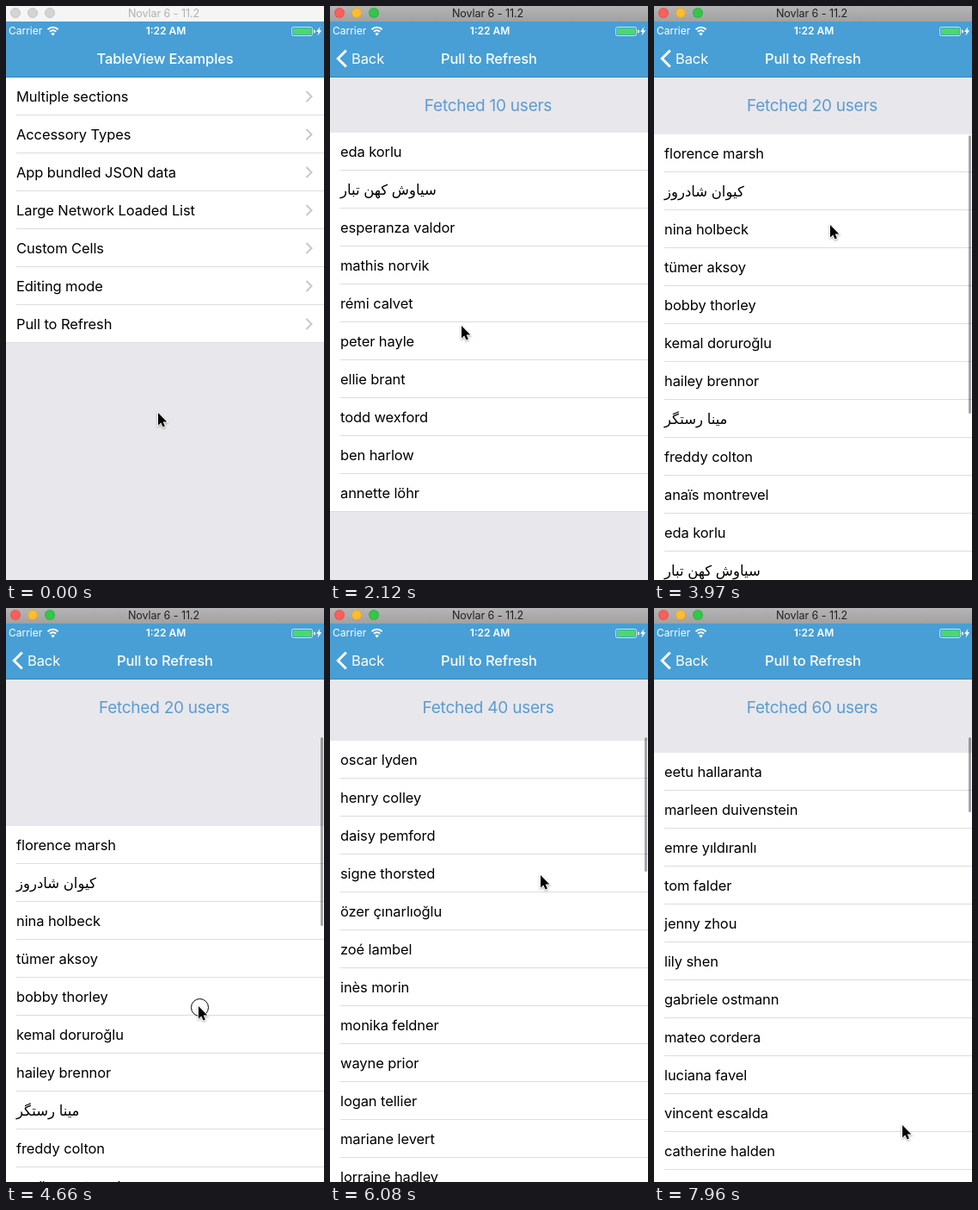
These frames come from a looping animation (370 by 666 pixels, 8000 ms). An HTML page:

```html
<!DOCTYPE html>
<html lang="en">
<head>
<meta charset="utf-8">
<title>TableView Examples</title>
<style>
  * { box-sizing: border-box; }
  html, body { margin: 0; width: 100%; height: 100%; overflow: hidden; background: #e8e7ec; }
  body { font: 16.5px/44px Inter, "Noto Sans", "DejaVu Sans", sans-serif; letter-spacing: -.1px; color: #000; }
  #stage { position: relative; width: 370px; height: 666px; overflow: hidden; white-space: nowrap; }
  #stage > *, .page, nav > *, .page > * { position: absolute; }
  ul { margin: 0; padding: 0; list-style: none; width: 370px; background: #fff; }
  li { position: relative; height: 44px; padding-left: 12px; }
  li::after { content: ""; position: absolute; left: 12px; right: 0; bottom: 0; height: 1px; background: #dddce0; }
  li:last-child::after { left: 0; }
  li.fa { letter-spacing: 0; }
  li svg { position: absolute; left: 347px; top: 14px; }
  li.on { background: #d9d9d9; }

  #bar { left: 0; top: 0; width: 370px; height: 18px; background: #f5f5f5; color: #b2b2b2;
         font-size: 12.6px; line-height: 17px; text-align: center; padding-right: 3px; }
  #bar i { position: absolute; top: 2px; width: 12px; height: 12px; border-radius: 50%;
           background: #d4d4d4; border: 1px solid #c4c4c4; }
  #bar.on { background: linear-gradient(#b5b5b5, #a1a1a1); color: #222; }
  #bar.on i { background: var(--c); border-color: rgba(0,0,0,.1); }

  nav { left: 0; top: 18px; width: 370px; height: 65px; background: #479fd6; color: #fff;
        border-bottom: 1px solid #3a86b6; overflow: hidden; }
  nav .small { top: 0; font-size: 12px; line-height: 22px; letter-spacing: 0; }
  nav .title { left: 0; width: 370px; top: 21px; text-align: center; font-weight: 500; letter-spacing: -.15px; }
  nav svg { left: 0; top: 0; }

  .page { left: 0; top: 83px; width: 370px; height: 583px; overflow: hidden; background: #e8e7ec; }
  #label { left: 0; width: 368px; top: 11px; text-align: center; font-size: 19px; letter-spacing: -.25px; color: #5a9cd1; }
  #scroll { left: 366px; top: 67px; width: 3px; border-radius: 2px; background: rgba(0,0,0,.35); }
  #mouse { left: 0; top: 0; overflow: visible; }
</style>
</head>
<body>
<div id="stage">
  <div class="page" id="menu"><ul></ul></div>
  <div class="page" id="detail">
    <div id="label"></div>
    <ul id="list"></ul>
    <div id="scroll"></div>
  </div>

  <nav>
    <span class="small" style="left:3px">Carrier</span>
    <span class="small" style="left:0;width:372px;text-align:center;font-weight:600">1:22 AM</span>
    <span class="title" id="title1">TableView Examples</span>
    <span class="title" id="title2">Pull to Refresh</span>
    <svg width="370" height="22" fill="none" stroke="#fff">
      <path d="M48.6 9.3a8.4 8.4 0 0 1 12 0M51 11.9a5 5 0 0 1 7.2 0" stroke-width="2"/>
      <path d="M54.6 16.5l-2.2-2.4a3 3 0 0 1 4.4 0z" fill="#fff" stroke="none"/>
      <rect x="332.5" y="6.500" width="24" height="10" rx="2" stroke-opacity=".7"/>
      <rect x="334" y="8" width="21" height="7" rx="1" fill="#4cd964" stroke="none"/>
      <path d="M358 9.500v4a2 2 0 0 0 0-4z" fill="#fff" stroke="none"/>
      <path d="M365.500 6l-4.500 6h2.600l-1 4.500 4.600-6.200h-2.700z" fill="#fff" stroke="none"/>
    </svg>
    <span id="back" style="left:25px;top:21px">Back</span>
    <svg id="arrow" width="24" height="60" fill="none" stroke="#fff" stroke-width="3"><path d="M18.800 33.500l-9.500 9.500 9.500 9.500"/></svg>
  </nav>

  <div id="bar">
    <i style="left:5px;--c:#fc5f5b"></i><i style="left:25px;--c:#fdbc33"></i><i style="left:45px;--c:#34c648"></i>
    Novlar 6 - 11.2
  </div>

  <svg id="mouse" width="1" height="1">
    <circle id="ring" cx="1.500" cy="1.500" r="10" fill="none" stroke="#000"/>
    <path d="M0 0V14.500L3.300 11.400 5.600 16.600 7.900 15.600 5.700 10.600H10.300Z" stroke="#fff" stroke-width="1.800"
          paint-order="stroke" style="filter:drop-shadow(0 1px 1px rgba(0,0,0,.35))"/>
  </svg>
</div>

<script>
const LOOP = 8000, ROW = 44, VIEW = 583, PUSH = 1540;
const $ = id => document.getElementById(id);

const topics = ['Multiple sections', 'Accessory Types', 'App bundled JSON data',
  'Large Network Loaded List', 'Custom Cells', 'Editing mode', 'Pull to Refresh'];

// Newest batch first, ten per line pair.
const people = `eetu hallaranta,marleen duivenstein,emre yıldıranlı,tom falder,jenny zhou,
lily shen,gabriele ostmann,mateo cordera,luciana favel,vincent escalda,
catherine halden,bernard whitlow,sanni korpi,karoline vester,vernon pratt,
gesa holtau,marijke dollaert,alan fenner,lucas tremblor,علیرضا کوهساری,
oscar lyden,henry colley,daisy pemford,signe thorsted,özer çınarlıoğlu,
zoé lambel,inès morin,monika feldner,wayne prior,logan tellier,
mariane levert,lorraine hadley,selim gülçari,deborah milner,nathaniel crowe,
carter wilmore,leo cabrera,petra dalen,aino rautanen,paige dalton,
florence marsh,کیوان شادروز,nina holbeck,tümer aksoy,bobby thorley,
kemal doruroğlu,hailey brennor,مینا رستگر,freddy colton,anaïs montrevel,
eda korlu,سیاوش کهن تبار,esperanza valdor,mathis norvik,rémi calvet,
peter hayle,ellie brant,todd wexford,ben harlow,annette löhr`.split(/,\s*/);

const chevron = '<svg width="12" height="16" fill="none" stroke="#c7c7cc" stroke-width="2"><path d="M2.500 2l6 6-6 6"/></svg>';
const menuList = document.querySelector('#menu ul');
menuList.innerHTML = topics.map(s => `<li>${s}${chevron}</li>`).join('');
$('list').innerHTML = people.map(s => `<li${/[\u0600-\u06ff]/.test(s) ? ' class="fa"' : ''}>${s}</li>`).join('');
const rows = [...$('list').children];

// Pointer path: time, x, y
const path = [
  [0, 177, 472], [60, 177, 472], [180, 178, 471], [1060, 178, 471], [1300, 184, 377], [1620, 184, 377],
  [2120, 153, 371], [2240, 139, 331], [2410, 200, 237], [2710, 200, 237], [2830, 201, 198], [3010, 201, 198],
  [3430, 209, 420], [3520, 209, 424], [3970, 205, 254], [4220, 208, 225], [4330, 208, 225],
  [4700, 224, 470], [4780, 224, 470], [5280, 229, 249], [5390, 229, 249],
  [5668, 243, 490], [5740, 243, 490], [6080, 245, 310], [6170, 244, 287], [6220, 244, 287],
  [6485, 252, 618], [6820, 252, 613], [7150, 270, 270], [7230, 270, 270], [7643, 288, 598], [7960, 289, 600], [8000, 289, 600]
];
// Press and release times
const clicks = [[370, 530], [830, 880], [1480, 1600]];
const pulls = [[2830, 3430], [4280, 4700], [5330, 5668], [6180, 6485], [7190, 7643]];

function pointer(t) {
  const i = path.findIndex(k => k[0] > t);
  const [t0, x0, y0] = path[i - 1], [t1, x1, y1] = path[i];
  const p = (t - t0) / (t1 - t0), e = p * p * (3 - 2 * p);
  return [x0 + (x1 - x0) * e, y0 + (y1 - y0) * e];
}

const settle = a => (1 + a) * Math.exp(-a);
const rubber = d => VIEW * (1 - 1 / (d * .55 / VIEW + 1));

function stretch(t) {
  let sum = 0;
  for (const [down, up] of pulls) {
    if (t < down) break;
    const reach = rubber(pointer(Math.min(t, up))[1] - pointer(down)[1]);
    sum += t < up ? reach : reach * settle((t - up) * .0105);
  }
  return Math.floor(sum);
}

const shift = (el, x, y = 0) => { el.style.transform = `translate(${Math.round(x)}px,${Math.round(y)}px)`; };
let shown = 0;

function showUsers(n) {
  if (n === shown) return;
  shown = n;
  rows.forEach((r, i) => { r.style.display = i < rows.length - n ? 'none' : ''; });
  $('label').textContent = `Fetched ${n} users`;
}

function draw(t) {
  $('bar').className = t >= 370 ? 'on' : '';
  menuList.lastChild.className = t >= 1480 ? 'on' : '';

  const p = t < PUSH ? 0 : 1 - settle((t - PUSH) * .016);
  shift($('menu'), -111 * p);
  shift($('detail'), 370 * (1 - p));
  shift($('title1'), -120 * p);
  shift($('title2'), 120 * (1 - p));
  shift($('back'), 80 * (1 - p));
  $('title1').style.opacity = Math.max(0, 1 - 1.6 * p);
  for (const id of ['title2', 'back', 'arrow']) $(id).style.opacity = p;

  const n = 10 + 10 * pulls.filter(q => t >= q[1]).length;
  const off = stretch(t);
  showUsers(n);
  shift($('list'), 0, 64 + off);
  $('scroll').style.height = Math.max(8, 6500 / n - off) + 'px';
  $('scroll').style.display = n > 10 ? '' : 'none';

  shift($('mouse'), ...pointer(t));
  $('ring').style.display = [...clicks, ...pulls].some(([a, b]) => t >= a && t < b) ? '' : 'none';
}

const start = performance.now();
function tick(now) {
  draw(Math.max(0, now - start) % LOOP);
  requestAnimationFrame(tick);
}
draw(0);
requestAnimationFrame(tick);
</script>
</body>
</html>
```
